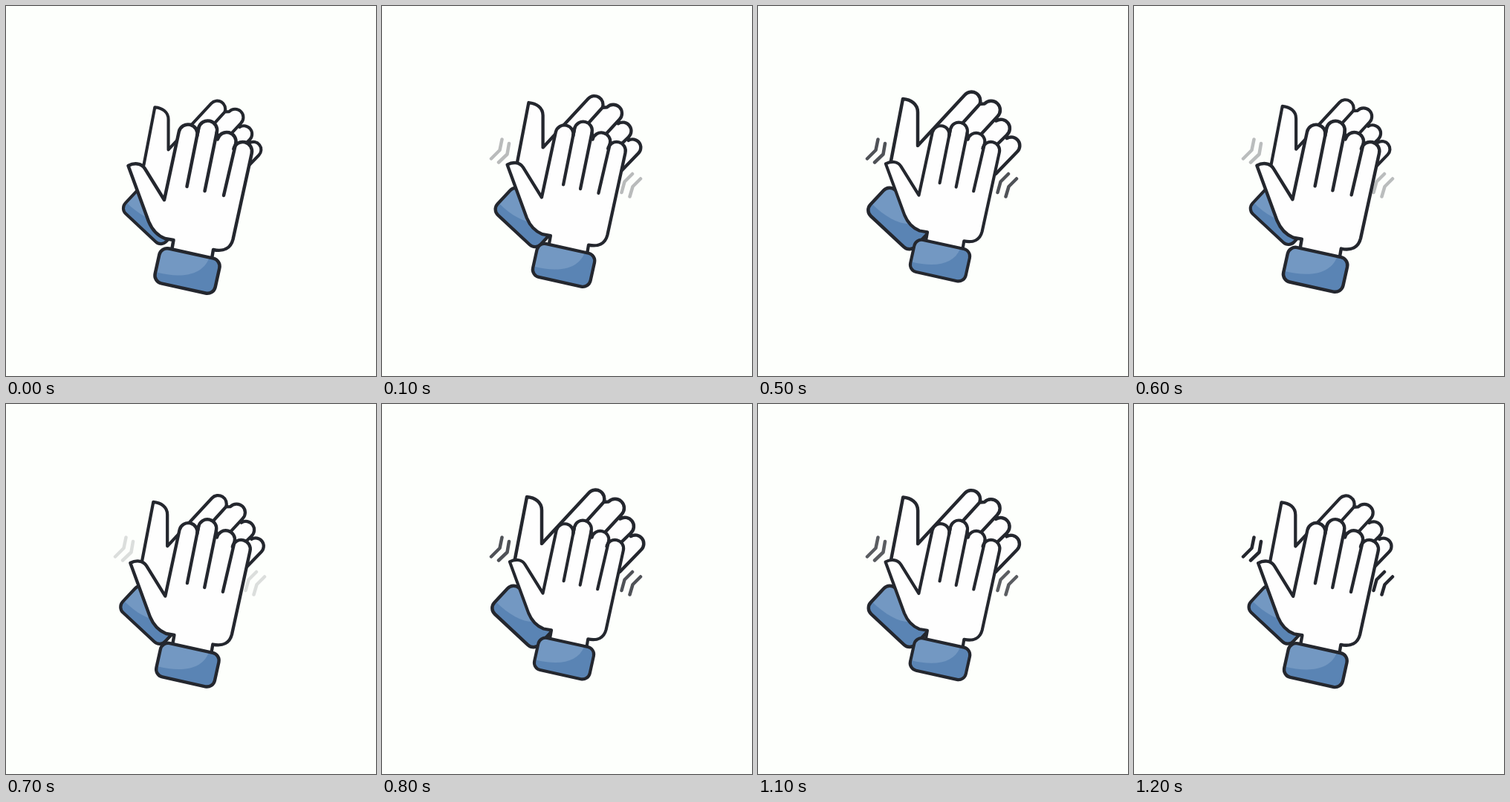
These frames come from a looping animation (498 px wide and 498 px high, 1.3 s). An HTML page:

```html
<!DOCTYPE html>
<html lang="en">
<head>
<meta charset="utf-8">
<title>Clapping hands</title>
<style>
  html, body { margin: 0; width: 100%; height: 100%; overflow: hidden; background: #fdfffc; }
  svg { display: block; width: 100vw; height: 100vh; }
  .ink { stroke: #24272e; stroke-width: 4.5; stroke-linejoin: round; stroke-linecap: round; fill: none; }
  .skin { fill: #fefefe; }
  .cuff { fill: #5a84b4; }
  .shine { fill: #7398c2; }
</style>
</head>
<body>
<svg viewBox="0 0 498 498">
  <defs>
    <g id="cuff">
      <rect class="cuff" x="-41.500" y="-24" width="83" height="48" rx="11"/>
      <path class="shine" d="M-41 11V-13Q-41 -23 -31 -23H25C21 1 -4 12 -41 11Z"/>
      <rect class="ink" x="-41.500" y="-24" width="83" height="48" rx="11"/>
    </g>
  </defs>

  <g id="marks" class="ink">
    <path d="M161.500 179.500L158.500 194L147 205.500M171 185L168.500 199.500L157 210.500"/>
    <path d="M337 226L326.500 236.500L322.500 251M348 232.500L337.500 243L333.500 256.500"/>
  </g>

  <g id="back">
    <use href="#cuff" transform="translate(190.500 286) rotate(43)"/>
    <path class="skin" d="M195 125C206 126 215 132 215 143V188L278.500 119.500A12 12 0 0 1 298.500 132L305 131.500A11.500 11.500 0 0 1 322.500 148.500L320.500 154.500A12 12 0 0 1 335 173.500V178A11.500 11.500 0 0 1 349 196L323 223L300 260L215 290L178.500 211Z"/>
    <path class="ink" d="M178.500 211L195 125C206 126 215 132 215 143V188L278.500 119.500A12 12 0 0 1 298.500 132L275 158M298.500 132L305 131.500A11.500 11.500 0 0 1 322.500 148.500L298.500 174.500M320.500 154.500A12 12 0 0 1 335 173.500L317 191M335 178A11.500 11.500 0 0 1 349 196L320 226"/>
  </g>

  <g id="front">
    <path class="skin ink" d="M223 329L225.500 315L214 313Q199 307 192 290L164.500 215C172 211 182 211 187 219L213 261L232.800 169A12.500 12.500 0 0 1 257.200 175L259.300 164A12.500 12.500 0 0 1 283.700 170L284.800 179.500A12.500 12.500 0 0 1 309.200 185.500L306.300 192.500A12.500 12.500 0 0 1 330.700 198.500L305.500 314C302.500 326 293 331 279 328L277 340"/>
    <path class="ink" d="M259.300 164L243.500 243M283.700 170L267.500 249M309.200 185.500L293 255"/>
    <use href="#cuff" transform="translate(244 356.500) rotate(12.500)"/>
  </g>
</svg>
<script>
  const LOOP = 1300, STEP = 100, CLAP = 310;
  const [marks, back, front] = ["marks", "back", "front"].map(id => document.getElementById(id));

  // One clap: phase, how far the hands are apart, mark opacity
  const clap = [
    [0, 0, 0], [.226, .3, .07], [.4, .75, .5], [.58, 1, .8], [.62, 1, .8],
    [.871, .35, 1], [.935, .12, .3], [.968, .12, .3], [1, 0, 0]
  ];

  function sample(phase) {
    const i = clap.findIndex(key => key[0] > phase);
    const a = clap[i - 1], b = clap[i];
    const k = (phase - a[0]) / (b[0] - a[0]);
    return [1, 2].map(n => a[n] + (b[n] - a[n]) * k);
  }

  function scaleAbout(el, x, y, s) {
    el.setAttribute("transform", `translate(${x} ${y}) scale(${s}) translate(${-x} ${-y})`);
  }

  function draw(ms) {
    const time = Math.floor(ms % LOOP / STEP) * STEP;
    const [apart, opacity] = sample(time / CLAP % 1);
    scaleAbout(back, 254, 248, (1 + .1 * apart) / 1.1);
    scaleAbout(front, 257, 182, 1 - .08 * apart);
    marks.setAttribute("opacity", opacity);
  }

  let start;
  function tick(now) {
    start ??= now;
    draw(now - start);
    requestAnimationFrame(tick);
  }
  draw(0);
  requestAnimationFrame(tick);
</script>
</body>
</html>
```
